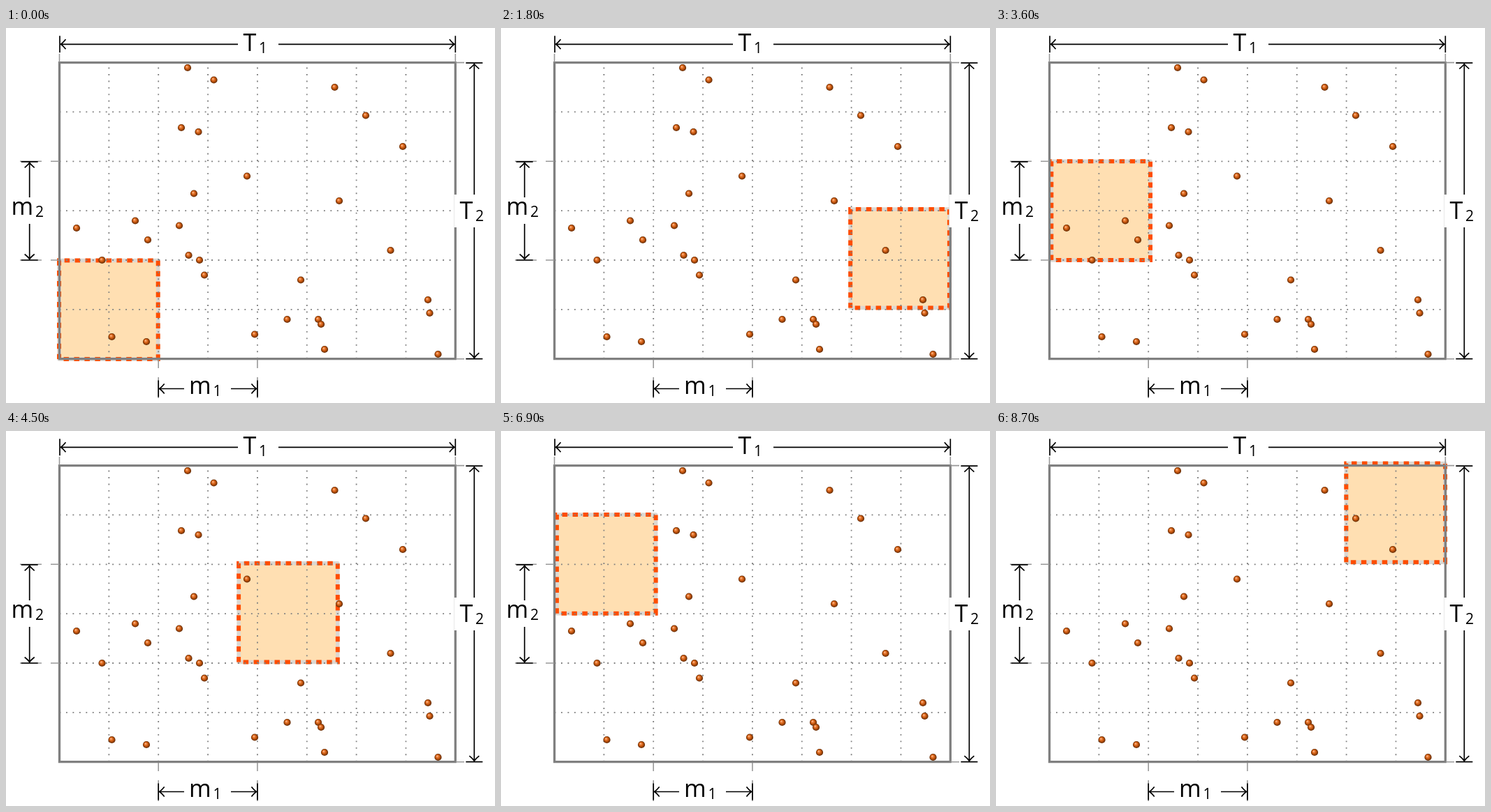
Recreate the animation shown at these times as an HTML page. Size 700 by 538 pixels, loop 9000 ms.

```html
<!DOCTYPE html>
<html>
<head>
<meta charset="utf-8">
<style>
  html, body { margin: 0; width: 100%; height: 100%; overflow: hidden; background: #fff; }
  svg { display: block; width: 700px; height: 538px; }
  text { font-family: "Open Sans", "Noto Sans", sans-serif; font-size: 34px; }
  tspan { font-size: 21px; }
  path { fill: none; }
</style>
</head>
<body>
<svg viewBox="0 0 700 538">
  <defs>
    <radialGradient id="ball" fx=".36" fy=".33">
      <stop offset="0" stop-color="#ffd0ac"/>
      <stop offset=".25" stop-color="#ee8745"/>
      <stop offset=".55" stop-color="#cc5a0f"/>
      <stop offset="1" stop-color="#5c2703"/>
    </radialGradient>
  </defs>
  <g id="window">
    <path class="outline" stroke="#dcd8d2" stroke-width="5.5" stroke-linejoin="round" style="fill:#ffdfb2"/>
    <path class="outline" stroke="#ff4d00" stroke-width="6" stroke-dasharray="7.47"/>
  </g>
  <path id="grid" stroke="#808080" stroke-width="1.8" stroke-dasharray="1.9 7.56"/>
  <path id="frame" stroke="#808080" stroke-width="3.3"/>
  <g id="balls" fill="url(#ball)"></g>
  <rect x="641.5" y="239" width="50" height="47" fill="#fff"/>
  <path id="ticks" stroke="#999" stroke-width="1.6"/>
  <path id="arrows" stroke="#000" stroke-width="1.7"/>
  <g id="labels"></g>
</svg>
<script>
const $ = id => document.getElementById(id);
const setPath = (id, d) => $(id).setAttribute("d", d);

// The field is 8 by 6 cells, the window 2 by 2.
const cell = 70.85, cols = 8, rows = 6, size = 2 * cell;
const X = i => 76.5 + i * cell;
const Y = j => 49.6 + j * cell;
const right = X(cols), bottom = Y(rows);

let grid = "";
for (let i = 1; i < cols; i++) grid += `M${X(i)} ${bottom}V${Y(0)}`;
for (let j = 1; j < rows; j++) grid += `M${X(0)} ${Y(j)}H${right}`;
setPath("grid", grid);
setPath("frame", `M${X(0)} ${Y(0)}H${right}V${bottom}H${X(0)}Z`);
document.querySelectorAll(".outline").forEach(path =>
  path.setAttribute("d", `M0 ${size}V0H${size}V${size}Z`));

// The observed scatter of points.
const balls = [
  [260, 57], [297.5, 74.5], [470.5, 85], [515, 125.5], [568, 170], [251, 143],
  [275.5, 149], [345, 212.5], [269, 237.5], [477, 248], [185, 276.5], [101, 287],
  [248, 283.5], [203, 304], [550.5, 319], [261.5, 326], [277, 333], [137.5, 333],
  [284, 354.5], [422, 361.5], [604, 390], [606.5, 409], [402.5, 418], [447, 418],
  [451, 425], [356, 439.5], [151.5, 443], [201, 450], [456, 461], [618.5, 468]
];
$("balls").innerHTML = balls.map(([x, y]) => `<circle cx="${x}" cy="${y}" r="5.1"/>`).join("");

// Grey ticks lead from the field to each dimension line.
setPath("ticks",
  [X(0), right].map(x => `M${x} 37V49`).join("") +
  [Y(0), bottom].map(y => `M644 ${y}H656`).join("") +
  [Y(2), Y(4)].map(y => `M20 ${y}H51M64 ${y}H76`).join("") +
  [X(2), X(4)].map(x => `M${x} 476V488M${x} 501V531`).join(""));

// Half a dimension line: shaft, open arrow head and end bar.
function halfArrow(tip, from, across, vertical) {
  const s = Math.sign(from - tip);
  const p = (along, side) => vertical ? `${across + side} ${along}` : `${along} ${across + side}`;
  const a = tip + s * 1.5, b = tip + s * 8.5;
  return `M${p(from, 0)}L${p(a, 0)}M${p(b, -7)}Q${p(a + s * 3, -2)} ${p(a, 0)}` +
    `Q${p(a + s * 3, 2)} ${p(b, 7)}M${p(tip, -12)}L${p(tip, 12)}`;
}
const dimension = (start, end, gapStart, gapEnd, across, vertical) =>
  halfArrow(start, gapStart, across, vertical) + halfArrow(end, gapEnd, across, vertical);
setPath("arrows",
  dimension(X(0) + .5, right, 332, 390, 23.3, false) +
  dimension(Y(0) + .5, bottom, 239, 286, 670.3, true) +
  dimension(X(2), X(4), 255, 322, 517.5, false) +
  dimension(Y(2) + .5, Y(4), 243, 281, 33.7, true));

const label = (letter, index, x, y, gap) =>
  `<text x="${x}" y="${y}">${letter}<tspan x="${x + gap}" dy="3">${index}</tspan></text>`;
$("labels").innerHTML =
  label("T", 1, 339.5, 33.3, 22.5) + label("T", 2, 649.5, 273.5, 22.5) +
  label("m", 1, 262, 525, 34.5) + label("m", 2, 7.5, 268.3, 34.5);

// The window sweeps five rows back and forth, six stops each, slightly tilted and swaying.
function draw(now) {
  const step = Math.floor(now % 9000 / 300);
  const row = Math.floor(step / 6);
  const along = step % 6 / 5;
  const k = row % 2 ? 1 - along : along;
  const x = 78 + 423 * k - 2 * Math.cos(row * 1.14);
  const y = 333.4 - 71.1 * row - 2.4 * k;
  $("window").setAttribute("transform", `translate(${x} ${y})`);
  requestAnimationFrame(draw);
}
draw(performance.now());
</script>
</body>
</html>
```
